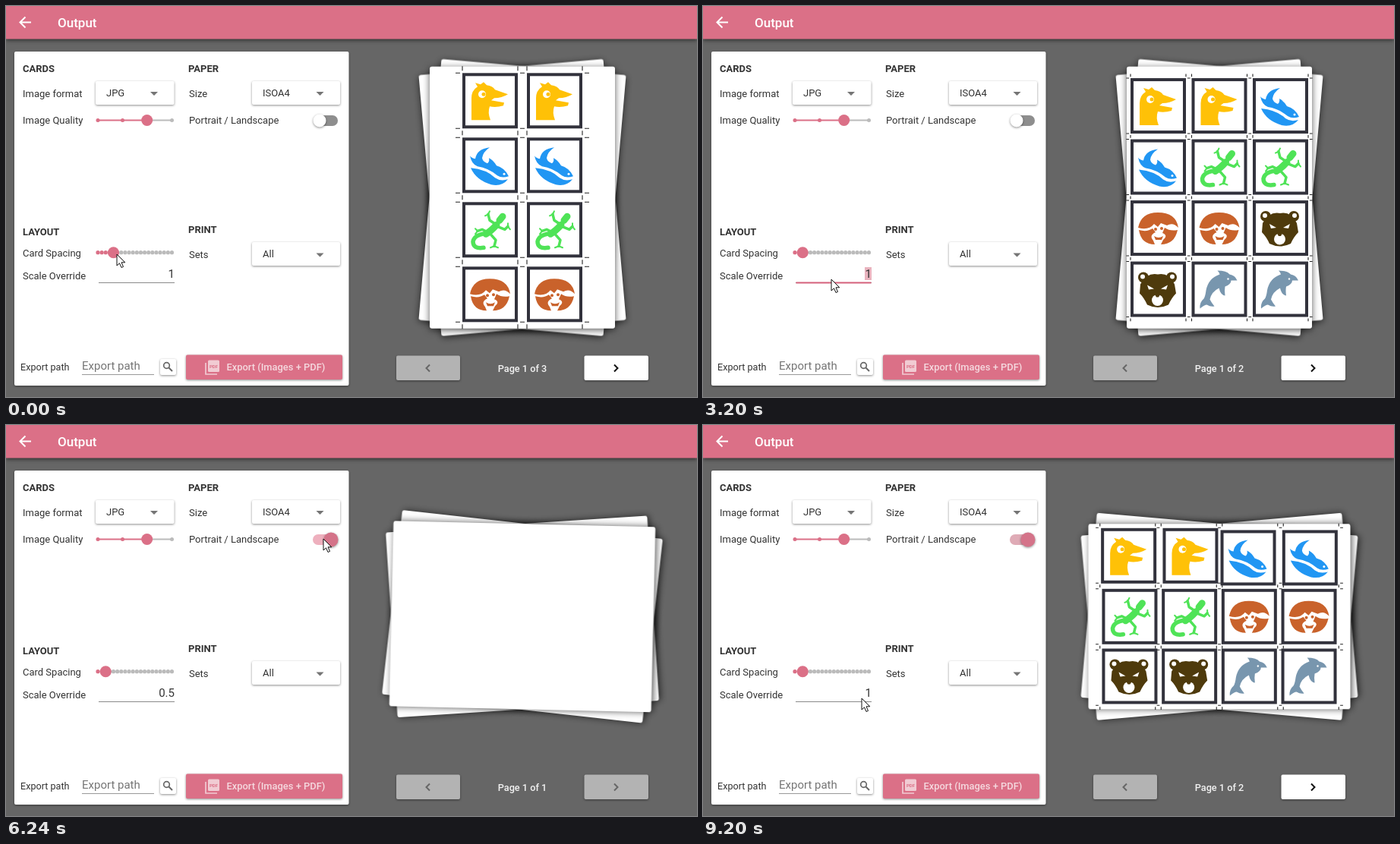
Recreate the animation shown at these times as an HTML page. Size 910x515 px, loop 9.71 s.

```html
<!DOCTYPE html>
<html lang="en">
<head>
<meta charset="utf-8">
<title>Output</title>
<style>
  html, body { margin: 0; width: 100%; height: 100%; overflow: hidden; background: #666; }
  svg { display: block; width: 910px; height: 515px; font: 13px Roboto, sans-serif; }
  text { fill: #333; white-space: pre; }
  .head { font-weight: 700; }
  .mid { font-weight: 500; }
  .pink { fill: #db7087; }
  .grey { fill: #bbb; }
  .up { filter: drop-shadow(0 1px 1.5px rgba(0,0,0,.45)); }
  .sheet { fill: #fff; filter: drop-shadow(0 2px 5px rgba(0,0,0,.65)); }
  .line { fill: none; stroke-width: 2; }
</style>
</head>
<body>
<svg viewBox="0 0 910 515">
  <defs id="icons"></defs>
  <rect width="910" height="515" fill="#666"/>

  <g id="paper">
    <rect class="sheet" x="-122" y="-172.5" width="244" height="345" rx="3" transform="rotate(-5)"/>
    <rect class="sheet" x="-122" y="-172.5" width="244" height="345" rx="3" transform="rotate(5)"/>
    <rect class="sheet" x="-122" y="-172.5" width="244" height="345" rx="3"/>
  </g>
  <g id="cards"></g>
  <path id="marks" class="line" stroke="#222" style="stroke-width:1.1"/>

  <rect class="up" x="514" y="460.500" width="84" height="32.500" rx="2" fill="#b3b3b3"/>
  <path class="line" stroke="#666" d="M558 472.500L553.500 477L558 481.500"/>
  <rect id="next" class="up" x="761.500" y="460.500" width="84.500" height="32.500" rx="2"/>
  <path id="chevron" class="line" d="M801 472.500L805.500 477L801 481.500"/>
  <text id="pages" class="mid" x="680" y="482" text-anchor="middle" font-size="12.700" style="fill:#f2f2f2"></text>

  <rect class="up" x="11" y="60" width="440.500" height="440" rx="2" fill="#fff"/>
  <text class="head" x="22" y="87">CARDS</text>
  <text class="head" x="240" y="87">PAPER</text>
  <text class="head" x="22" y="301.500">LAYOUT</text>
  <text class="head" x="240" y="299">PRINT</text>
  <text x="22" y="119.500">Image format</text>
  <text x="22" y="154.500">Image Quality</text>
  <text x="241" y="119.500">Size</text>
  <text x="241" y="155">Portrait / Landscape</text>
  <text x="22" y="329.500">Card Spacing</text>
  <text x="241" y="332">Sets</text>
  <text x="22" y="359.500">Scale Override</text>
  <text x="19" y="480" font-size="12.600">Export path</text>

  <g class="up" fill="#fff">
    <rect x="118" y="99" width="103.500" height="31" rx="2"/>
    <rect x="324" y="99" width="116" height="31" rx="2"/>
    <rect x="324" y="311" width="116" height="31" rx="2"/>
    <rect x="203" y="465" width="21" height="21" rx="2"/>
  </g>
  <path fill="#757575" d="M190 113h10l-5 5zM408.500 113h10l-5 5zM408.500 325.500h10l-5 5z"/>
  <text x="132" y="119">JPG</text>
  <text x="338" y="119">ISOA4</text>
  <text x="338" y="331">All</text>

  <path class="line" stroke="#bbb" d="M186 150.500H219"/>
  <path class="line" stroke="#db7087" d="M121 150.500H186"/>
  <circle class="grey" cx="218.500" cy="150.500" r="2.500"/>
  <g class="pink">
    <circle cx="121" cy="150.500" r="2.500"/><circle cx="153.500" cy="150.500" r="2.500"/>
    <circle cx="185.700" cy="150.500" r="7.500"/>
  </g>

  <rect id="track" y="144" width="30" height="14" rx="7"/>
  <circle id="knob" class="up" cy="151"/>

  <g id="ticks"></g>
  <circle id="thumb" class="pink" cy="324.700"/>
  <g id="bubble">
    <path class="pink" d="M0-7.500L-13-20.300A18.500 18.500 0 1 1 13-20.300Z"/>
    <text id="count" class="head" y="-29.500" text-anchor="middle" style="fill:#fbe6ea"></text>
  </g>

  <rect id="select" x="213" y="344" width="9" height="17" fill="#e9b3be"/>
  <text id="scale" x="222" y="357.500" text-anchor="end" font-size="15"></text>
  <path class="line" stroke="#8a8a8a" style="stroke-width:1" d="M122 364.500H222"/>
  <path id="focus" class="line" stroke="#d4607a"/>

  <text x="100" y="479" font-size="15" style="fill:#757575">Export path</text>
  <path class="line" stroke="#999" style="stroke-width:1" d="M100 485.500H195"/>
  <g class="line" stroke="#666"><circle cx="211.500" cy="473.500" r="3.800" style="stroke-width:1.700"/><path d="M214.500 476.500L219 481"/></g>

  <rect class="up pink" x="237" y="459.500" width="206" height="32.500" rx="2"/>
  <g fill="#f1cbd3">
    <path class="line" style="stroke-width:1.700" stroke="#f1cbd3" d="M263 470v15h15"/>
    <rect x="266" y="466.500" width="15" height="15.500" rx="1.500"/>
    <text x="273.500" y="477" text-anchor="middle" font-size="6" font-weight="700" style="fill:#db7087">PDF</text>
  </g>
  <text class="mid" x="290.500" y="480" font-size="12.900" style="fill:#f5d9df">Export (Images + PDF)</text>

  <rect class="pink" width="910" height="43.500" style="filter:drop-shadow(0 2px 2.500px rgba(0,0,0,.5))"/>
  <path class="line" stroke="#fff" d="M33 21.500H19M25.500 14.500L18.500 21.500L25.500 28.500"/>
  <text class="mid" x="68" y="27.500" font-size="17" style="fill:#fff">Output</text>
  <path id="cursor" fill="#fff" stroke="#111" d="M0 0V15L3.500 11.800L6 17.500L8.500 16.400L6 10.800H10.800Z"/>
</svg>

<script>
const LOOP = 9710, CX = 680, CY = 252.3, TURN = 5850, SPREAD = 6450;
const $ = id => document.getElementById(id);
const set = (id, attrs) => { for (const k in attrs) $(id).setAttribute(k, attrs[k]); };
const clamp = v => Math.max(0, Math.min(1, v));
const easeOut = v => 1 - (1 - clamp(v)) ** 4;

// Animals, drawn in a 73 unit card
const shape = (fill, d, extra = '') => `<path fill="${fill}" d="${d}"/>${extra}`;
const lines = (colour, ...parts) => `<g fill="none" stroke="${colour}" stroke-linecap="round" stroke-linejoin="round">` +
  parts.map(([w, d]) => `<path stroke-width="${w}" d="${d}"/>`).join('') + '</g>';
const dot = (x, y, r, fill = '#fff') => `<circle cx="${x}" cy="${y}" r="${r}" fill="${fill}"/>`;
const legs = lines('#2c1145', [2.6, 'M40 38L52 31V14M42 41L58 40L62 28M42 44L56 50L58 62M39 47L48 56L46 64']);
const animals = [
  shape('#ffc107', 'M12 62V33Q12 23 20 18L17 13L24 15L28 12L32 16Q40 17 43 22L60 28Q52 33 42 33L38 36L55 39L54 43Q44 46 36 44Q33 52 37 62Z',
    dot(26, 28, 5) + dot(28, 28, 2.5, '#ffc107')),
  shape('#2196f3', 'M36 13Q19 15 17 28Q12 27 10 24Q12 35 20 38Q34 40 46 50Q52 54 61 51Q56 40 45 37Q41 30 35 27Q36 32 33 34Q27 32 26 27Q27 19 36 13ZM11 40Q18 56 38 62Q52 65 60 55Q50 58 43 53Q32 42 11 40Z',
    dot(55, 48, 1.5)),
  lines('#4fe357', [9, 'M53 19L49 24M45 30Q38 38 31 42'], [5.5, 'M50 22L44 32M34 41Q16 42 14 52Q14 62 28 60'],
    [3.5, 'M45 30L36 24L34 16M46 32L56 36L60 32M34 40L26 36L20 38M37 42L44 50L42 58'],
    [2, 'M30 18L34 16L36 12M60 28V32L63 36M17 35L20 38L17 42M37 60L42 58L47 60']),
  shape('#c9622b', 'M10 36Q14 16 36 16Q60 16 63 36Q56 28 48 33L40 30L36 35L31 31Q24 40 10 36ZM11 39Q22 42 29 37L33 42Q24 46 30 53L32 58Q14 58 11 39ZM62 39Q52 41 45 36L42 43Q50 46 43 52L40 58Q58 58 62 39ZM31 47Q37 51 43 47L41 52H33Z',
    dot(33, 38, 2, '#c9622b') + dot(41, 37, 2, '#c9622b')),
  dot(17, 21, 7, '#4e3a0c') + dot(54, 21, 7, '#4e3a0c') + dot(16, 20, 3) + dot(55, 20, 3) +
    shape('#4e3a0c', 'M13 30Q22 14 36 17Q50 14 58 30L60 42Q54 48 50 57Q36 64 22 57Q18 48 12 42Z', dot(35.5, 51, 7.5)) +
    shape('#fff', 'M22 31L31 36L24 37ZM49 31L40 36L47 37Z') + shape('#4e3a0c', 'M31 42H40L37 47H34Z'),
  shape('#7896ae', 'M60 25Q57 18 50 17Q46 12 34 12Q37 15 37 17Q22 22 19 38Q18 46 16 49Q10 54 11 62Q17 57 20 57Q25 60 30 59Q26 54 24 50Q26 40 36 35Q38 44 44 45Q43 38 44 33Q52 30 52 25Z',
    dot(48, 23, 1.2)),
  lines('#dcb0e8', [5, 'M34 30Q36 46 24 48Q14 48 16 40M38 30Q44 44 56 40Q62 34 56 28M36 34Q40 52 34 60M36 36Q48 48 54 60M28 32Q20 38 12 30']) +
    dot(32, 22, 11, '#dcb0e8') + dot(28, 25, 2) + dot(36, 25, 2),
  shape('#b8b8b8', 'M11 58V32Q14 20 30 20Q38 14 50 18Q61 22 61 36V52Q61 60 55 58V52H57V40L50 42V58H42V46H28V58H20V46L16 58Z',
    lines('#fff', [1.8, 'M40 22Q34 34 44 37L48 28'])),
  shape('#2e8540', 'M12 44Q16 24 36 24Q50 25 54 42ZM16 46H26L22 54H14ZM42 46H52L54 54H46ZM54 33Q62 29 64 38Q60 45 54 42Z',
    lines('#fff', [1.8, 'M18 35L26 41L33 33L41 41L49 34M26 27L33 33L41 26'])),
  shape('#333', 'M13 60L14 36Q16 20 32 20Q38 10 48 14Q56 20 54 30Q62 40 60 60H48V44Q40 50 34 44L32 60H24L26 48L22 60Z',
    lines('#fff', [1.6, 'M42 22L49 24M36 32Q42 36 48 33'])),
  dot(36.5, 24, 11, '#2c1145') + dot(36.5, 42, 7, '#2c1145') + legs + `<g transform="translate(73 0) scale(-1 1)">${legs}</g>`,
  shape('#a8692e', 'M12 48Q14 42 28 32L34 24L36 10L42 22L48 10V26Q58 34 60 60H38Q40 52 34 48L22 54Q14 56 12 48Z', dot(34, 33, 1.6)),
];
$('icons').innerHTML = animals.map((a, i) => `<g id="a${i}">${a}</g>`).join('');
$('cards').innerHTML = Array.from({ length: 24 }, (_, i) =>
  `<g><rect x="2" y="2" width="69" height="69" fill="#fff" stroke="#32323c" stroke-width="4"/><use href="#a${i >> 1}"/></g>`).join('');
$('ticks').innerHTML = Array.from({ length: 20 }, (_, i) => `<circle cx="${121 + i * 5.13}" cy="324.700" r="2.600"/>`).join('');
const cards = [...$('cards').children], ticks = [...$('ticks').children];

// Page layouts: start, columns, rows, pitch, card size, pages, slider value
const layouts = [
  [0, 2, 4, 85, 73, 3, 5], [480, 2, 4, 82.7, 73, 3, 4], [620, 3, 4, 80.5, 73, 2, 3],
  [790, 3, 4, 78.2, 72, 2, 2], [960, 3, 4, 76, 71, 2, 1], [1600, 3, 4, 78.2, 72, 2, 2],
  [1710, 3, 4, 80.5, 73, 2, 3], [4660, 5, 7, 43.5, 36, 1, 3], [SPREAD, 7, 5, 43.5, 36, 1, 3],
  [8500, 2, 2, 117, 109, 6, 3], [9060, 4, 3, 80.5, 73, 2, 3],
].map(([t, cols, rows, pitch, size, pages, slide]) =>
  ({ t, cols, rows, pitch, size, pages, slide, count: Math.min(24, cols * rows) }));

const typed = [[0, '1'], [3840, ''], [3940, '0'], [4220, '0.'], [4350, '0.5'],
  [8100, '1'], [8180, '1.'], [8330, '1.5'], [8840, '1']];
const path = [[360, 146, 327], [960, 127, 330], [1580, 127, 330], [1740, 137, 330], [2560, 137, 330],
  [3000, 169, 360], [5270, 169, 360], [5800, 418, 150], [6330, 418, 150], [6900, 209, 360]];

const within = (t, ...spans) => spans.some(([a, b]) => t >= a && t < b);

function cursorAt(t) {
  const i = path.findIndex(p => p[0] > t);
  if (i < 1) return (i ? path[path.length - 1] : path[0]).slice(1);
  const [a, b] = [path[i - 1], path[i]], u = (t - a[0]) / (b[0] - a[0]), k = u * u * (3 - 2 * u);
  return [a[1] + (b[1] - a[1]) * k, a[2] + (b[2] - a[2]) * k];
}

function cell(l, i) {
  return [CX + (i % l.cols - (l.cols - 1) / 2) * l.pitch,
          CY + (Math.floor(i / l.cols) - (l.rows - 1) / 2) * l.pitch];
}

function cropMarks(l) {
  const half = l.pitch / 2, edge = l.size / 2, len = (l.pitch - l.size) / 2;
  let d = '';
  for (let i = 0; i < l.cols * l.rows; i++) {
    const [x, y] = cell(l, i);
    for (const sx of [-1, 1]) for (const sy of [-1, 1])
      d += `M${x + sx * edge} ${y + sy * half - len / 2}v${len}M${x + sx * half - len / 2} ${y + sy * edge}h${len}`;
  }
  return d;
}

function drawPage(t) {
  const n = layouts.findLastIndex(l => l.t <= t), l = layouts[n], prev = layouts[n - 1];
  const hidden = within(t, [TURN, SPREAD]);
  const k = prev ? easeOut((t - l.t) / 230) : 1;
  cards.forEach((card, i) => {
    const show = !hidden && i < l.count;
    card.style.display = show ? '' : 'none';
    if (!show) return;
    const [x, y] = cell(l, i);
    const [px, py] = prev && l.t !== SPREAD && i < prev.count ? cell(prev, i) : [CX, CY];
    card.setAttribute('transform', `translate(${px + (x - px) * k} ${py + (y - py) * k}) scale(${l.size / 73}) translate(-36.5 -36.5)`);
  });
  set('marks', { d: hidden || l.slide === 1 ? '' : cropMarks(l) });
  set('paper', { transform: `translate(${CX} ${CY}) rotate(${-90 * easeOut((t - TURN) / 600)})` });
  $('pages').textContent = `Page 1 of ${l.pages}`;
  set('next', { fill: l.pages > 1 ? '#fff' : '#b3b3b3' });
  set('chevron', { stroke: l.pages > 1 ? '#111' : '#666' });
  return l.slide;
}

function drawSlider(t, value) {
  const x = 121 + (value - 1) * 5.13;
  const open = easeOut((t - 360) / 180) * (1 - clamp((t - 2460) / 180));
  ticks.forEach((c, i) => c.setAttribute('class', i < value ? 'pink' : 'grey'));
  set('thumb', { cx: x, r: 7.5 * (1 - open) });
  set('bubble', { transform: `translate(${x + .5} 324.7) scale(${open})` });
  $('count').textContent = value;
}

function drawField(t) {
  const text = typed.findLast(s => s[0] <= t)[1];
  const wide = text.length > 1 ? 21 : 9;
  $('scale').textContent = text;
  set('select', { x: 222 - wide, width: wide, opacity: +within(t, [3130, 3840], [7340, 8100], [8650, 8840]) });
  set('focus', { d: within(t, [3080, 4670], [7270, 8500], [8640, 9070]) ? 'M122.5 364.5H221.5' : '' });
}

function drawToggle(t) {
  const k = clamp((t - TURN) / 130), on = k > .5;
  set('track', { x: 407 - 3 * k, fill: on ? (t < SPREAD ? '#eeb0be' : '#dfabb6') : '#8e8e8e' });
  set('knob', { cx: 413 + 15 * k, r: 8.5 + k, fill: on ? '#d47389' : '#fff' });
}

function draw(t) {
  drawSlider(t, drawPage(t));
  drawField(t);
  drawToggle(t);
  set('cursor', { transform: `translate(${cursorAt(t).join(' ')})` });
}

const start = performance.now();
(function tick() {
  draw((performance.now() - start) % LOOP);
  requestAnimationFrame(tick);
})();
</script>
</body>
</html>
```
